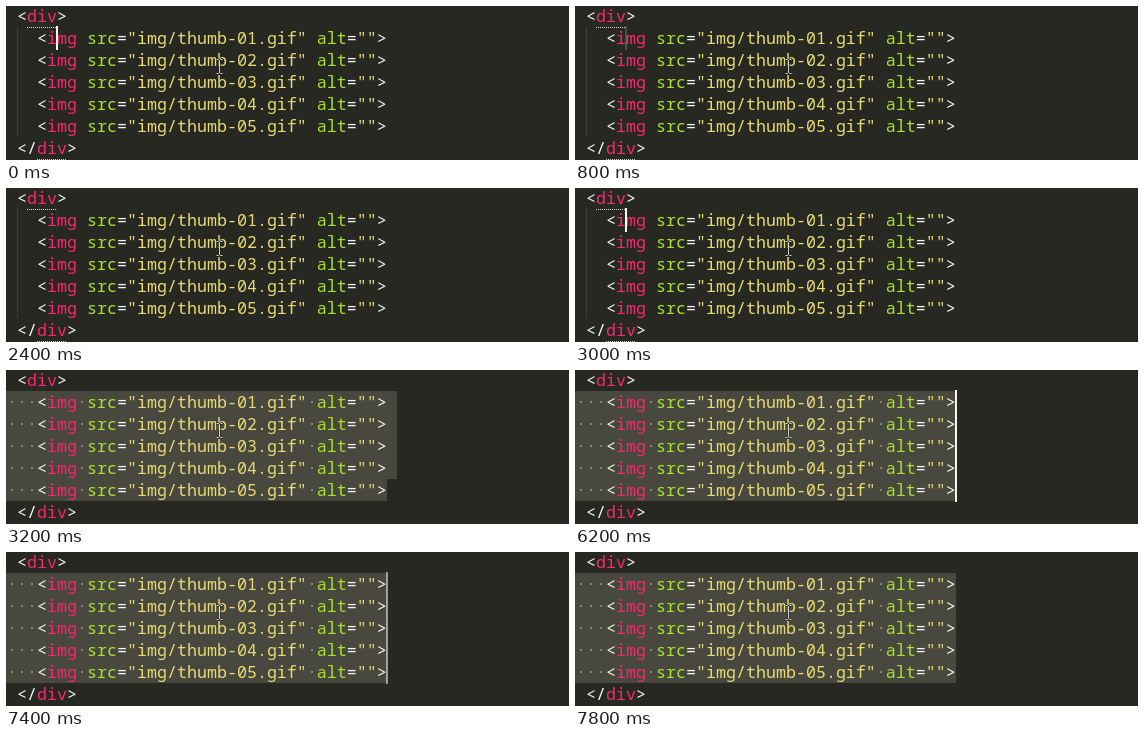
Write an HTML page that moves like this. It is 563 px wide and 154 px high and loops after 8 s.

```html
<!DOCTYPE html>
<html lang="en">
<head>
<meta charset="utf-8">
<title>Code selection</title>
<style>
  html, body { margin: 0; width: 100%; height: 100%; overflow: hidden; background: #272822; }
  svg { display: block; width: 100%; height: 100%; }
  text { font: 16.667px "Noto Sans Mono", "DejaVu Sans Mono", monospace; fill: #f8f8f2; white-space: pre; }
  .tag { fill: #f92672; }
  .attr { fill: #a6e22e; }
  .str { fill: #e6db74; }
  .sel { fill: #49483e; }
  .dot { fill: #85847a; }
  .caret { fill: #f8f8f2; }
  .guide { stroke: #55564c; stroke-dasharray: 1 1; }
  .under { stroke: #d8d8d2; stroke-dasharray: 1 1; }
  .rule { shape-rendering: crispEdges; }
  .halo { stroke: #1c1d18; stroke-width: 2; }
  .beam { stroke: #d4d4d0; stroke-width: 1; }
</style>
</head>
<body>
<svg id="stage" viewBox="0 0 563 154" preserveAspectRatio="none"></svg>
<script>
const LOOP = 8000, STEP = 200, SELECT = 3200, SPLIT = 6200;
const CHAR = 10, LEFT = 1, ROW = 22, TOP = -1;
const ROWS = [1, 2, 3, 4, 5];
// Caret opacity over one blink of five steps
const BLINK = [1, 0.5, 0.03, 0.03, 0.2];
const MULTI_BLINK = [1, 0.55, 0.1, 0, 0];

const stage = document.getElementById("stage");
const col = n => LEFT + n * CHAR;
const rowTop = n => TOP + n * ROW;

function add(parent, name, attrs, text) {
  const el = document.createElementNS("http://www.w3.org/2000/svg", name);
  for (const key in attrs) el.setAttribute(key, attrs[key]);
  if (text) el.textContent = text;
  parent.appendChild(el);
  return el;
}

const group = () => add(stage, "g", {});
const show = (el, on) => el.setAttribute("visibility", on ? "visible" : "hidden");

function codeLine(row, column, parts) {
  const line = add(stage, "text", { x: col(column), y: rowTop(row) + 17 });
  for (const [kind, text] of parts) add(line, "tspan", { class: kind }, text);
}

function selectRow(parent, row, right, radius) {
  add(parent, "rect", { class: "sel", x: -8, y: rowTop(row), width: right + 8, height: ROW, rx: radius });
}

function rule(parent, kind, d) {
  add(parent, "path", { class: "rule " + kind, d, fill: "none" });
}

function underline(row, column) {
  const y = rowTop(row + 1) + 0.5;
  rule(idle, "under", `M${col(column)} ${y}H${col(column + 3)}`);
}

// Layers behind the text
const block = group(), split = group(), idle = group(), dots = group();

for (const row of ROWS) {
  selectRow(block, row, row < 5 ? col(39) : col(38), 0);
  selectRow(split, row, col(38), 1.5);
  for (const c of [0, 1, 2, 7, 30]) {
    add(dots, "rect", { class: "dot", x: col(c) + 4, y: rowTop(row) + 10, width: 2, height: 2 });
  }
}
rule(idle, "guide", `M11.5 ${rowTop(1)}V${rowTop(6)}`);
underline(0, 2);
underline(6, 3);

codeLine(0, 1, [["", "<"], ["tag", "div"], ["", ">"]]);
for (const row of ROWS) {
  codeLine(row, 3, [
    ["", "<"], ["tag", "img"], ["attr", " src"], ["", "="],
    ["str", `"img/thumb-0${row}.gif"`], ["attr", " alt"], ["", "="], ["str", '""'], ["", ">"]
  ]);
}
codeLine(6, 1, [["", "</"], ["tag", "div"], ["", ">"]]);

const caret = add(stage, "rect", { class: "caret", y: rowTop(1) - 1, width: 2 });

// Mouse pointer
const beam = "M210.5 53.5H212.5L213.5 54.5L214.5 53.5H216.5M213.5 54V67M210.5 67.5H212.5L213.5 66.5L214.5 67.5H216.5";
for (const kind of ["halo", "beam"]) add(stage, "path", { class: kind, d: beam, fill: "none" });

function draw(time) {
  const t = time % LOOP;
  const selected = t >= SELECT, multi = t >= SPLIT;
  show(idle, !selected);
  show(dots, selected);
  show(block, selected && !multi);
  show(split, multi);
  show(caret, !selected || multi);

  const step = Math.floor((multi ? t - SPLIT : t) / STEP) % BLINK.length;
  caret.setAttribute("x", (multi ? col(38) : col(5)) - 1);
  caret.setAttribute("height", (multi ? ROWS.length : 1) * ROW + 2);
  caret.setAttribute("opacity", (multi ? MULTI_BLINK : BLINK)[step]);
}

const start = performance.now();
function tick() {
  draw(performance.now() - start);
  requestAnimationFrame(tick);
}
tick();
</script>
</body>
</html>
```
